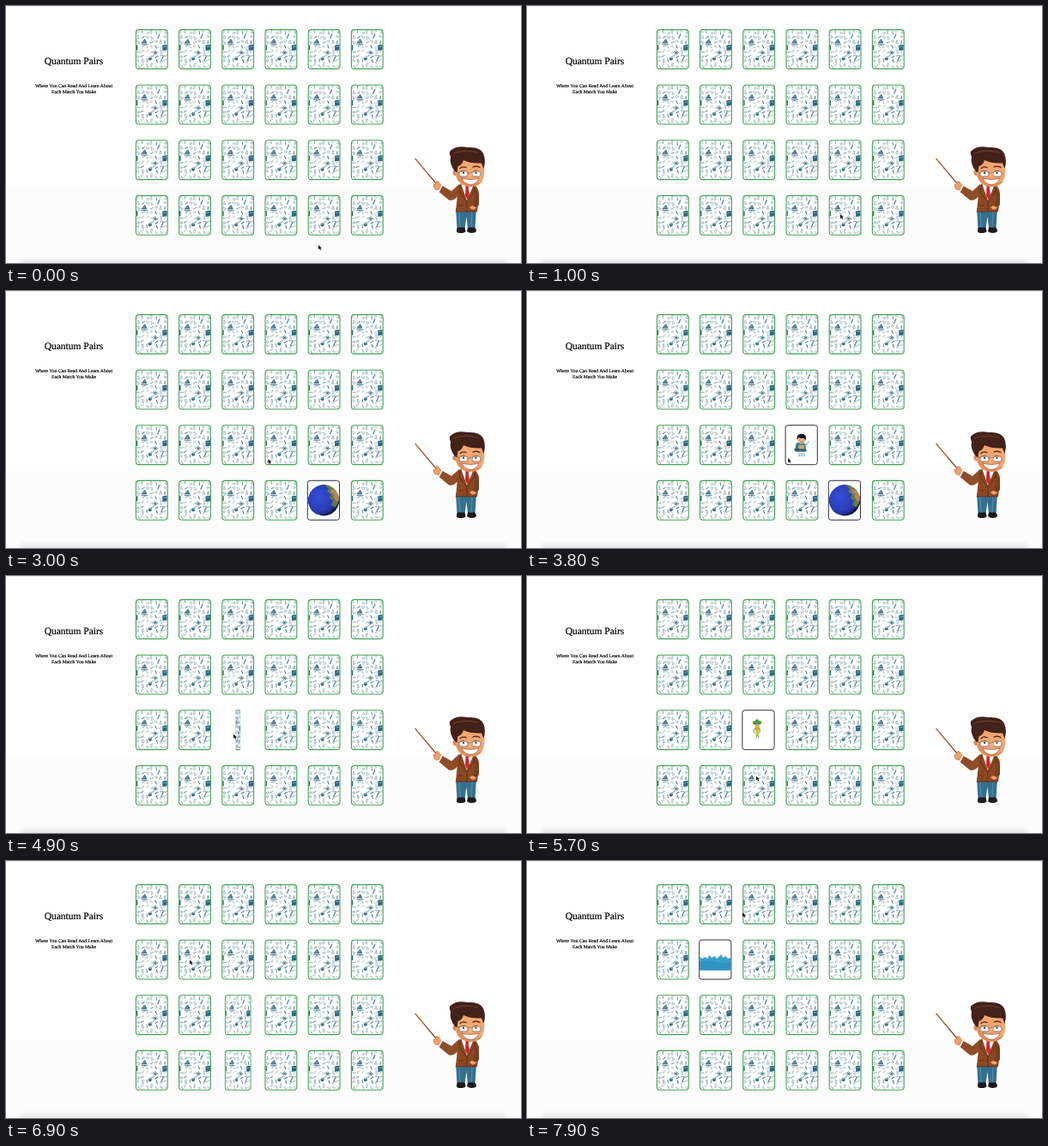
Recreate the animation shown at these times as an HTML page. Size 600 by 300 pixels, loop 8 s.

```html
<!DOCTYPE html>
<html lang="en">
<head>
<meta charset="utf-8">
<title>Quantum Pairs</title>
<style>
html, body { margin: 0; width: 100%; height: 100%; overflow: hidden; background: #fdfdfd; }
svg { display: block; width: 600px; height: 300px; }
text { font-family: "Liberation Serif", Times, serif; text-anchor: middle; text-rendering: geometricPrecision; }
</style>
</head>
<body>
<svg viewBox="0 0 600 300">
  <defs>
    <radialGradient id="ocean" cx=".35" cy=".4" r=".7">
      <stop stop-color="#3450d8"/><stop offset=".65" stop-color="#2a3cb4"/><stop offset="1" stop-color="#141c50"/>
    </radialGradient>
    <filter id="soft" x="-5%" y="-200%" width="110%" height="500%"><feGaussianBlur stdDeviation="2.6"/></filter>
    <clipPath id="disc"><circle r="18.2"/></clipPath>
    <clipPath id="paper"><rect x="-18" y="-22.5" width="36" height="45" rx="3"/></clipPath>

    <g id="back">
      <rect x="-18.4" y="-22.9" width="36.8" height="45.8" rx="3.4" fill="#fcfefd"/>
      <g id="doodles" clip-path="url(#paper)" fill="none" stroke-linecap="round"></g>
      <rect x="-18.4" y="-22.9" width="36.8" height="45.8" rx="3.4" fill="none" stroke="#45a355" stroke-width="1.1"/>
    </g>

    <g id="blank">
      <rect x="-18.6" y="-23" width="37.2" height="46" rx="3" fill="#fff" stroke="#33333a" stroke-width="1"/>
    </g>

    <g id="globe">
      <use href="#blank"/>
      <g clip-path="url(#disc)">
        <circle r="18.2" fill="url(#ocean)"/>
        <path d="M1-18 6-13 4-10 9-7 7-3 11 1 9 5 14 9 20 4V-18Z" fill="#6b7b4c"/>
        <path d="M5-16 9-12 8-9 12-7 12-3 16 2 19-1 15-12Z" fill="#b08a58"/>
        <path d="M3-17 7-14 12-13M9-5 13 1M11 4 15 5" fill="none" stroke="#3c7447" stroke-width="1.6" stroke-dasharray="1.2 .8"/>
        <path d="M19-7Q18 13-5 18.5L19 20Z" fill="#0c1230" opacity=".7"/>
      </g>
    </g>

    <g id="pupil">
      <use href="#blank"/>
      <path d="M-6-2Q0-5 5-1L5 8H-7V2Z" fill="#2f8294"/>
      <path d="M-3 0H3V7H-4Z" fill="#e0a35f"/>
      <path d="M4 1 9-4" stroke="#7eaab2" stroke-width="1.1"/>
      <path d="M-8 4 6 5V7H-8Z" fill="#26596a"/>
      <ellipse cy="-6" rx="4.5" ry="4.6" fill="#efbd94"/>
      <path d="M-5-6Q-6-13 0-13Q7-13 5-5L3-8Q-1-7-3-9Z" fill="#17191f"/>
      <path d="M-2.4-5.8H-1M1.6-5.8H3M-1.2-3.4H1.6" stroke="#423029" stroke-width=".7"/>
      <text y="13.2" font-size="5.4" fill="#79aabd" style="font-family:'Liberation Sans',sans-serif;font-weight:700">308</text>
    </g>

    <g id="sprout">
      <use href="#blank"/>
      <g transform="translate(-1.8 -.6)">
        <path d="M-2-4 3-4 3 1Q2 5 1.5 8H-1Q-.5 4-2 1Z" fill="#c3ca3f"/>
        <path d="M-2-2 3-3 3 0-2 1Z" fill="#e7a53a"/>
        <path d="M-2-2-4 2-2 5M3-2 4 2 2 4M0 7-1 10.5M1.4 7 2 10.5" fill="none" stroke="#5d9a3b" stroke-width=".9"/>
        <g fill="#4f9c35"><circle cx="-2.6" cy="-8" r="2.2"/><circle cx=".5" cy="-9.5" r="2.4"/><circle cx="3.4" cy="-8" r="2.1"/></g>
        <path d="M-3-6.4H4" stroke="#286e2e"/>
        <path d="M-2-5H3" stroke="#cf4c32"/>
      </g>
    </g>

    <g id="water">
      <use href="#blank"/>
      <path d="M-18-3-15-1-12-3-9-1-7-5-4-2-1-4 2-1 5-4 7-6 9-2 12-4 15-1 18-2V12.5H-18Z" fill="#38a0ca"/>
      <path d="M-18 2Q-9 0 0 3T18 2V12.5H-18Z" fill="#2e94c1"/>
    </g>
  </defs>

  <rect width="600" height="300" fill="#fefefe"/>
  <rect y="210" width="600" height="90" fill="#fcfcfc"/>
  <rect x="17" y="296" width="566" height="8" fill="#e6e6e6" filter="url(#soft)"/>
  <rect width="600" height="1" fill="#eeeeee"/>

  <g fill="#000" stroke="#000">
    <text x="79" y="67.7" font-size="11.5" stroke-width=".2">Quantum Pairs</text>
    <g font-size="5.68" stroke-width=".17">
      <text x="79" y="95">Where You Can Read And Learn About</text>
      <text x="79" y="101.6">Each Match You Make</text>
    </g>
  </g>

  <g id="cards"></g>

  <g id="teacher" stroke-linejoin="round" stroke-linecap="round">
    <path d="M477 178.5 506 213" stroke="#8b4a22" stroke-width="1.2"/>
    <path d="M477 178.5 490 194" stroke="#c98042" stroke-width=".8"/>
    <path d="M524 236H548L546.5 260H538L536.5 246 534.5 260H525.5Z" fill="#35708f"/>
    <path d="M528 241 529 258M543 241 542 258" stroke="#4d8aa8" stroke-width="1.4"/>
    <path d="M526 258.5H534.5L535.5 263Q534 265.5 528 265Q523 264.5 526 258.5ZM538 258.5H546Q550 263 546 264.6Q540 266 537 263Z" fill="#1f1a1c"/>
    <path d="M528 208 519 216 508.5 210 504.5 217 516 226.5Q522 228 527 221Z" fill="#8f4d27"/>
    <path d="M527 209Q537 205 546 209Q552 213 551 224L549 240H524Z" fill="#8b4822"/>
    <path d="M546 211Q552 218 551 232L547 236 544 232 546 225Z" fill="#77401f"/>
    <path d="M530 207 537 227 545 208Z" fill="#fff"/>
    <path d="M535.5 210H539.5L538.8 213 540 221 537.4 226 535 221Z" fill="#c7282f"/>
    <path d="M530 208 528 217 537 229 546 216 545 209M537 229V240M528 233H532M524 240H548" fill="none" stroke="#582b17" stroke-width=".8"/>
    <path d="M508.5 210 505 216.5 503 214.5 506.5 209Z" fill="#fff"/>
    <path d="M507 209 504 215Q499 215 498 211L498 208 500.5 208 501.5 204.5Q505 204 505.5 208Z" fill="#ee9f69" stroke="#a9623a" stroke-width=".4"/>
    <path d="M543 233 548 235Q546 239 542 237L540 235Z" fill="#ee9f69"/>
    <ellipse cx="523.5" cy="194.5" rx="3" ry="3.6" fill="#e08b55"/>
    <path d="M524 182Q538 174 555 181Q559 190 556.5 200Q553 211 541 211Q528 210 524.5 199Z" fill="#f2a66f"/>
    <path d="M524.5 199Q528 210 541 211Q551 211 555 204Q544 209 535 205Q528 202 526.5 194Z" fill="#e28f58"/>
    <path d="M523 193Q516 184 518 176Q515 170 519 168Q525 162.500 538 165Q552 164 556 172Q559.500 180 556.500 190L554 183.500Q541 184 533 180Q531 186 526.500 187L525.500 194Z" fill="#43221a"/>
    <path d="M521 172Q534 167 550 171" fill="none" stroke="#6b3b2a" stroke-width="1.2"/>
    <path d="M529 189.500Q532 187 536 188.500M544 188Q548 186 552 188.500" fill="none" stroke="#43221a" stroke-width="1.3"/>
    <path d="M530 193.600Q533 191.500 536 193.600M544.500 193.600Q547.500 191.500 550.500 193.600" fill="none" stroke="#39261f" stroke-width=".9"/>
    <g fill="#fbf5ee" stroke="#5b5a60" stroke-width=".7">
      <rect x="528" y="193" width="10" height="6" rx="2.2"/><rect x="543" y="193" width="10" height="6" rx="2.2"/>
      <path d="M524 193.500 528 194.500M538 195H543" fill="none"/>
    </g>
    <circle cx="533" cy="194.800" r="1.100" fill="#39261f"/><circle cx="547.500" cy="194.800" r="1.100" fill="#39261f"/>
    <path d="M539.500 195Q537.500 200 541 200Q544.500 200 543 195" fill="#f5ae78"/>
    <path d="M531 201Q541 204 551 201Q548 208.500 541 208.500Q533.500 208 531 201Z" fill="#fff" stroke="#943b2e" stroke-width=".6"/>
  </g>

  <path id="cursor" d="M0 0V5.2L1.3 4.1 2.2 6 3.2 5.5 2.3 3.7H3.9Z" fill="#111" stroke="#fff" stroke-width=".45" paint-order="stroke"/>
</svg>
<script>
const LOOP = 8000, STEP = 100, FLIP = 400;
const $ = id => document.getElementById(id);
const smooth = p => p * p * (3 - 2 * p);
const clamp = p => Math.max(0, Math.min(1, p));

let seed = 23;
const random = () => (seed = seed * 16807 % 2147483647) / 2147483647;

// Small laboratory icons, centred on the origin
const icons = [
  '<circle r="1.2"/>',
  '<path d="M-.7-1.8V1.8H.7V-1.8Z"/>',
  '<path d="M-.5-1.6V-.5L-1.5 1.5H1.5L.5-.5V-1.6Z"/>',
  '<path d="M0-1.8V1.6" stroke-width="1"/>',
  '<circle cx="-1" r=".6"/><circle cx="1.1" cy="-.7" r=".5"/>',
  '<path d="M-1.4 1Q-.5-1.6.2 0T1.6-.8"/>'
];

// Larger drawings sit here, so small icons keep clear
const landmarks = [[-8.5, -8], [15, -2], [4, 4], [-2, 11], [-18, -2], [12, 11], [8, -15]];

function drawDoodles() {
  const inks = ['#3f6d80', '#5d8f99', '#8aa5b3', '#587f98'];
  let art = '';
  for (let row = 0; row < 8; row++) for (let col = 0; col < 7; col++) {
    const x = -15.6 + col * 5.2 + (random() - .5) * 2;
    const y = -19.8 + row * 5.6 + (random() - .5) * 2;
    const icon = icons[Math.floor(random() * icons.length)];
    const ink = inks[Math.floor(random() * inks.length)];
    const turn = Math.round(random() * 120 - 60);
    if (landmarks.some(([lx, ly]) => Math.hypot(lx - x, ly - y) < 3.6)) continue;
    art += `<g transform="translate(${x} ${y}) rotate(${turn})" stroke="${ink}" stroke-width=".42">${icon}</g>`;
  }
  $('doodles').innerHTML = art + `
    <path d="M-12-5.600H-4.800M-11.500-7.400H-6L-8-11.500Z" stroke="#2c5876" stroke-width=".8" fill="#5d8aa0"/>
    <path d="M12.500-4.800 18-5.600V1L12.500 1.600Z" fill="#2f6780"/><path d="M14-2.800 17-3.300" stroke="#a8cedc" stroke-width=".6"/>
    <path d="M-18.500-5H-16.500V1H-18.500Z" fill="#2b7358"/>
    <g stroke="#4a7f8e" stroke-width=".5"><ellipse cx="4" cy="4" rx="3" ry="1.200"/><ellipse cx="4" cy="4" rx="1.200" ry="3"/></g>
    <circle cx="4" cy="4" r=".9" fill="#2c5673"/>
    <circle cx="-2" cy="11" r="2.100" fill="#337084"/><path d="M-3 10H-1" stroke="#b6dce2" stroke-width=".7"/>
    <path d="M11 13.500 13.500 8M7-13 9-17.500" stroke="#5b8596" stroke-width="1.300"/>`;
}

// Each turn opens a face; "close" is when it starts to turn back
const turns = [
  { row: 3, col: 4, face: 'globe', open: 2250, close: 4050 },
  { row: 2, col: 3, face: 'pupil', open: 3150, close: 4050 },
  { row: 2, col: 2, face: 'sprout', open: 4713, close: 6615 },
  { row: 3, col: 2, face: 'pupil', open: 5720, close: 6615 },
  { row: 1, col: 1, face: 'water', open: 7100, close: Infinity }
];

// time, x, y
const route = [
  [0, 364, 279], [250, 364, 279], [1000, 365, 243], [2000, 365, 239.5], [2500, 365, 239.5],
  [3050, 304, 195], [3900, 304, 195], [4550, 265, 184.5], [5050, 265, 184.5],
  [5600, 267, 233.5], [6100, 267, 233.5], [6750, 214, 115.5], [7250, 214, 115.5], [7800, 251, 60]
];

const cards = [];
function dealCards() {
  for (let row = 0; row < 4; row++) for (let col = 0; col < 6; col++) {
    const turn = turns.find(t => t.row === row && t.col === col);
    const x = 169.8 + col * 50.2, y = 50.5 + row * 64.6;
    $('cards').insertAdjacentHTML('beforeend', `<g transform="translate(${x} ${y})"><use href="#back"/></g>`);
    if (turn) cards.push({ turn, x, y, node: $('cards').lastElementChild });
  }
}

function cursorAt(t) {
  const i = route.findIndex(stop => stop[0] > t);
  if (i < 0) return route[route.length - 1].slice(1);
  const [start, x, y] = route[i - 1], [end, nextX, nextY] = route[i];
  const p = smooth((t - start) / (end - start));
  return [x + (nextX - x) * p, y + (nextY - y) * p];
}

function render(t) {
  for (const { turn, x, y, node } of cards) {
    const opened = smooth(clamp((t - turn.open) / FLIP));
    const closed = smooth(clamp((t - turn.close) / FLIP));
    const cos = Math.cos((opened - closed) * Math.PI);
    const left = cos < 0 ? x - .7 : x;
    node.setAttribute('transform', `translate(${left} ${y}) scale(${Math.max(.02, Math.abs(cos))} 1)`);
    node.firstElementChild.setAttribute('href', '#' + (cos < 0 ? turn.face : 'back'));
  }
  $('cursor').setAttribute('transform', `translate(${cursorAt(t).join(' ')})`);
}

drawDoodles();
dealCards();
const began = performance.now();
function tick() {
  const t = (performance.now() - began) % LOOP;
  render(Math.floor(t / STEP) * STEP);
  requestAnimationFrame(tick);
}
tick();
</script>
</body>
</html>
```
